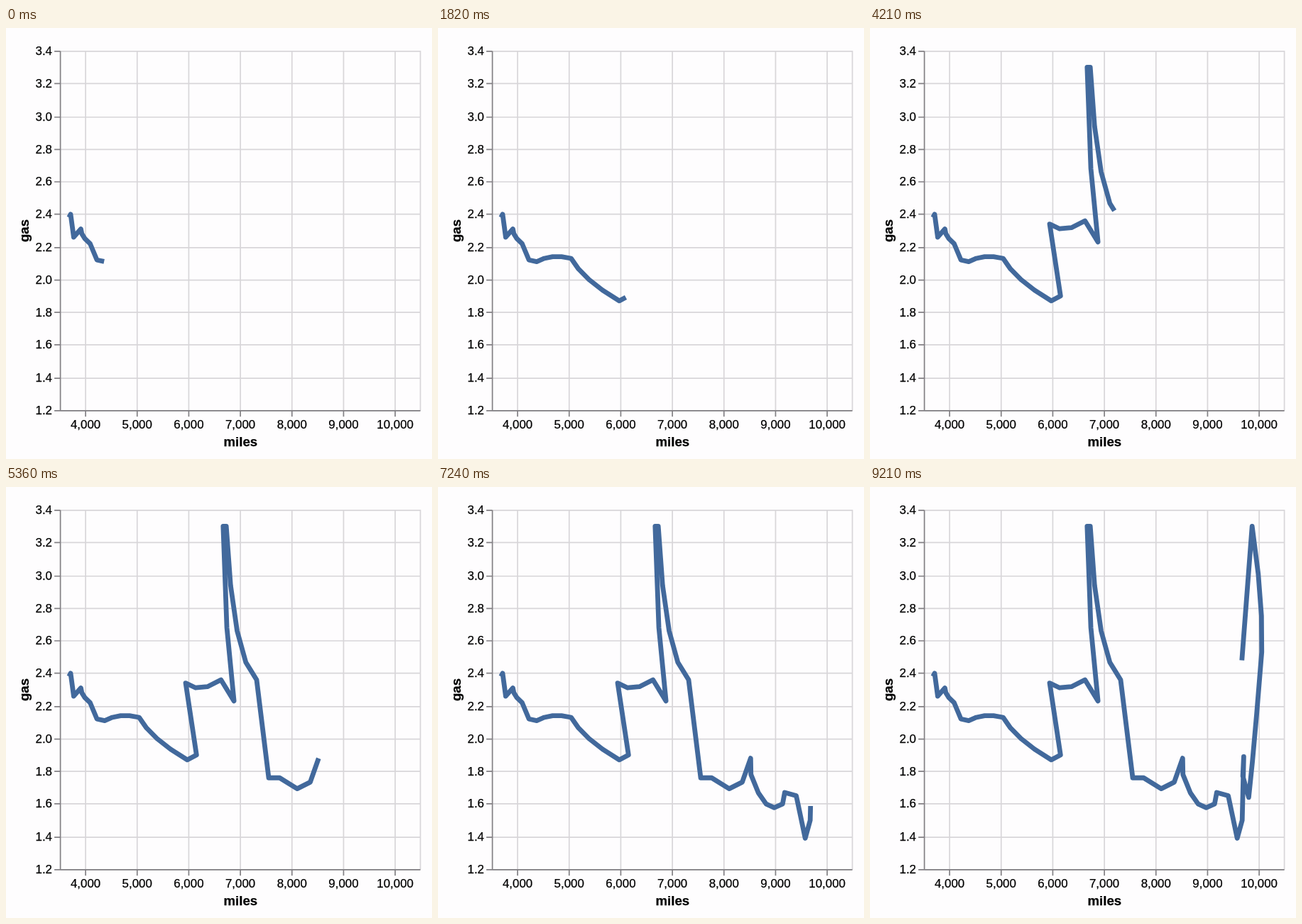
An HTML page for the animation above (9.24 s loop, 600x608 px).

```html
<!DOCTYPE html>
<html lang="en">
<head>
<meta charset="utf-8">
<title>Miles and gas</title>
<style>
  html, body { margin: 0; width: 100%; height: 100%; overflow: hidden; background: #fefdfe; }
  svg { display: block; width: 600px; height: 608px; }
  text {
    font: 16.9px "Liberation Sans", Arial, sans-serif;
    text-anchor: middle; fill: #000; stroke: #000; stroke-width: .25px;
  }
  .left { text-anchor: end; }
  .title { font-weight: bold; font-size: 18.6px; }
  .grid, .axis { fill: none; stroke-width: 1.7; }
  .grid { stroke: #d8d6d9; }
  .axis { stroke: #828084; }
  #trace { fill: none; stroke: #42699c; stroke-width: 6.8; stroke-linejoin: round; }
</style>
</head>
<body>
<svg viewBox="0 0 600 608">
  <path id="grid" class="grid"/>
  <path id="axis" class="axis"/>
  <g id="labels"></g>
  <text class="title" x="330.3" y="589.7">miles</text>
  <text class="title" transform="translate(31.5 286) rotate(-90)">gas</text>
  <polyline id="trace" transform="translate(-.5 -.5)"/>
</svg>
<script>
const LOOP = 9240, STEP = 30;
const START = 7.92, RATE = 4.883; // years since the first point, years per second
const LEFT = 76.6, TOP = 32.8, UNITS = 300, ZOOM = 1.69;
const RIGHT = LEFT + UNITS * ZOOM, BOTTOM = TOP + UNITS * ZOOM;

const el = id => document.getElementById(id);
const unitX = miles => (miles - 3500) / 7000 * UNITS;
const unitY = cents => (340 - cents) / 220 * UNITS;
// Ticks snap to whole chart units
const tickX = miles => LEFT + Math.round(unitX(miles)) * ZOOM;
const tickY = cents => TOP + Math.round(unitY(cents)) * ZOOM;

// The trace has one vertex per year
const years = [[3675, 238]];

// Spreads some years along a parabola, bent at its middle by the given amounts
function curve(count, miles, cents, bendMiles, bendCents) {
  const [m, c] = years[years.length - 1];
  for (let k = 1; k <= count; k++) {
    const t = k / count, bow = 4 * t * (1 - t);
    years.push([m + (miles - m) * t + bendMiles * bow, c + (cents - c) * t + bendCents * bow]);
  }
}
const line = (miles, cents) => curve(1, miles, cents, 0, 0);

function buildTrace() {
  line(3706, 240);
  line(3766, 226);
  line(3905, 231);
  curve(3, 4085, 222, -45, 0);
  line(4218, 212);
  line(4369, 211);
  curve(4, 5038, 213, -25, 2);
  curve(4, 5973, 187, -120, 0);
  line(6154, 190);
  line(5943, 234);
  curve(3, 6630, 236, -40, -4);
  line(6883, 223);
  line(6744, 268);
  line(6672, 330);
  line(6732, 330);
  curve(4, 7323, 236, -84, -17);
  line(7558, 176);
  line(7770, 176);
  curve(3, 8529, 188, 100, -12);
  line(8535, 178);
  curve(4, 9150, 160, -12, -9);
  line(9192, 167);
  line(9416, 165);
  line(9590, 139);
  line(9687, 150);
  line(9717, 189);
  line(9699, 177);
  line(9814, 164);
  curve(3, 10067, 253, -15, -9);
  curve(3, 9880, 330, 64, -4);
  line(9657, 238);
}

function drawAxes() {
  let grid = `M${LEFT} ${TOP}H${RIGHT}V${BOTTOM}`;
  let axis = `M${LEFT} ${TOP}V${BOTTOM}H${RIGHT}`;
  let labels = "";
  for (let m = 4000; m <= 10000; m += 1000) {
    const x = tickX(m);
    grid += `M${x} ${TOP}V${BOTTOM}`;
    axis += `M${x} ${BOTTOM}v8.5`;
    labels += `<text x="${x}" y="565">${m.toLocaleString("en-US")}</text>`;
  }
  for (let c = 120; c <= 340; c += 20) {
    const y = tickY(c);
    if (c < 340) grid += `M${LEFT} ${y}H${RIGHT}`;
    axis += `M${LEFT} ${y}h-8.5`;
    labels += `<text class="left" x="65" y="${y + 5.3}">${(c / 100).toFixed(1)}</text>`;
  }
  el("grid").setAttribute("d", grid);
  el("axis").setAttribute("d", axis);
  el("labels").innerHTML = labels;
}

function drawTrace(ms) {
  const year = START + RATE * ms / 1000;
  const i = Math.floor(year), next = years[i + 1];
  const tip = years[i].map((v, k) => v + (next[k] - v) * (year - i));
  const points = [...years.slice(0, i + 1), tip]
    .map(([m, c]) => [LEFT + unitX(m) * ZOOM, TOP + unitY(c) * ZOOM]);
  el("trace").setAttribute("points", points.join(" "));
}

const begin = performance.now();
function tick() {
  const t = (performance.now() - begin) % LOOP;
  drawTrace(Math.floor(t / STEP) * STEP);
  requestAnimationFrame(tick);
}

buildTrace();
drawAxes();
tick();
</script>
</body>
</html>
```
